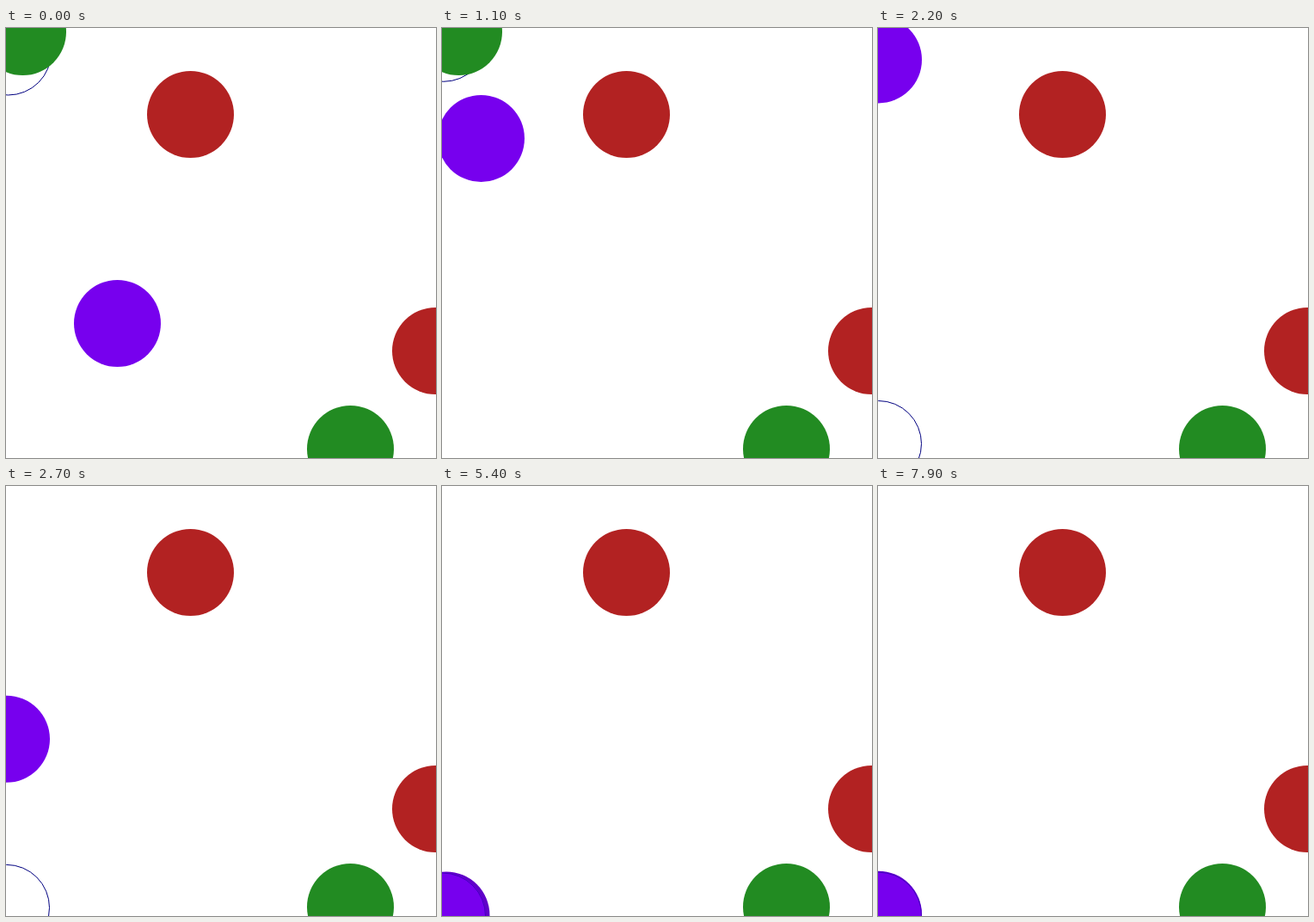
An HTML page with a canvas for the animation above (8 s loop, 500 by 500 pixels).

```html
<!DOCTYPE html>
<html>
<head>
<meta charset="utf-8">
<style>
html, body { margin: 0; width: 100%; height: 100%; overflow: hidden; background: #fff; }
canvas { display: block; }
</style>
</head>
<body>
<canvas id="stage" width="500" height="500"></canvas>
<script>
const ctx = document.getElementById('stage').getContext('2d');
const LOOP = 8000, STEP = 100, SIZE = 500, R = 50.5;
const RED = '#b22222', GREEN = '#228b22', PURPLE = '#7700ee', SHADE = '#6000c8', NAVY = '#000080';

// Progress from 0 to 1 between two times
const part = (t, from, to) => Math.min(1, Math.max(0, (t - from) / (to - from)));
const ease = u => u * u * u * (10 + u * (6 * u - 15));
const hop = (t, from, to) => Math.sin(Math.PI * part(t, from, to));
const lift = t => 9 * hop(t, 6300, 7950);

// Flies to the top left corner, drops along the edge, then wobbles at the bottom
function ballAt(t) {
  const x = Math.max(0.5, 129.5 - 0.0764 * t) + 5.5 * hop(t, 3300, 6300);
  const y = Math.max(22, 343.5 - 0.1955 * t)
    + 477 * ease(part(t, 1990, 3310))
    - 7 * hop(t, 3300, 5400) - lift(t);
  return [x, y];
}

// Creeps up past the top edge, reappears at the bottom and settles there
function ringAt(t) {
  const rise = part(t, 500, 2200);
  const y = 28 - 44.5 * rise;
  const wrapped = y < -8 ? y + SIZE : y;
  return [2.5 - 2 * rise, wrapped + 16.5 * part(t, 2200, 3400) - lift(t)];
}

function trace(x, y, r) {
  ctx.beginPath();
  ctx.arc(x, y, r, 0, Math.PI * 2);
}

function disc(x, y, color) {
  trace(x, y, R);
  ctx.fillStyle = color;
  ctx.fill();
}

function outline(x, y) {
  trace(x, y, R - 0.5);
  ctx.strokeStyle = NAVY;
  ctx.lineWidth = 1;
  ctx.stroke();
}

function draw(t) {
  const [bx, by] = ballAt(t);
  const [rx, ry] = ringAt(t);
  const caught = Math.hypot(bx - rx, by - ry) < 12;

  ctx.fillStyle = '#fff';
  ctx.fillRect(0, 0, SIZE, SIZE);
  if (!caught) outline(rx, ry);
  if (t < 1300) disc(19.5, 4.5, GREEN);
  disc(400.5, 489.5, GREEN);
  disc(214.5, 100.5, RED);
  disc(499.5, 375.5, RED);

  disc(bx, by, caught ? SHADE : PURPLE);
  if (caught) {
    ctx.save();
    trace(bx, by, R);
    ctx.clip();
    disc(rx, ry, PURPLE);
    ctx.globalAlpha = 0.45;
    outline(rx, ry);
    ctx.restore();
  }
}

const start = performance.now();
function tick() {
  const t = (performance.now() - start) % LOOP;
  draw(Math.floor(t / STEP) * STEP);
  requestAnimationFrame(tick);
}
tick();
</script>
</body>
</html>
```
